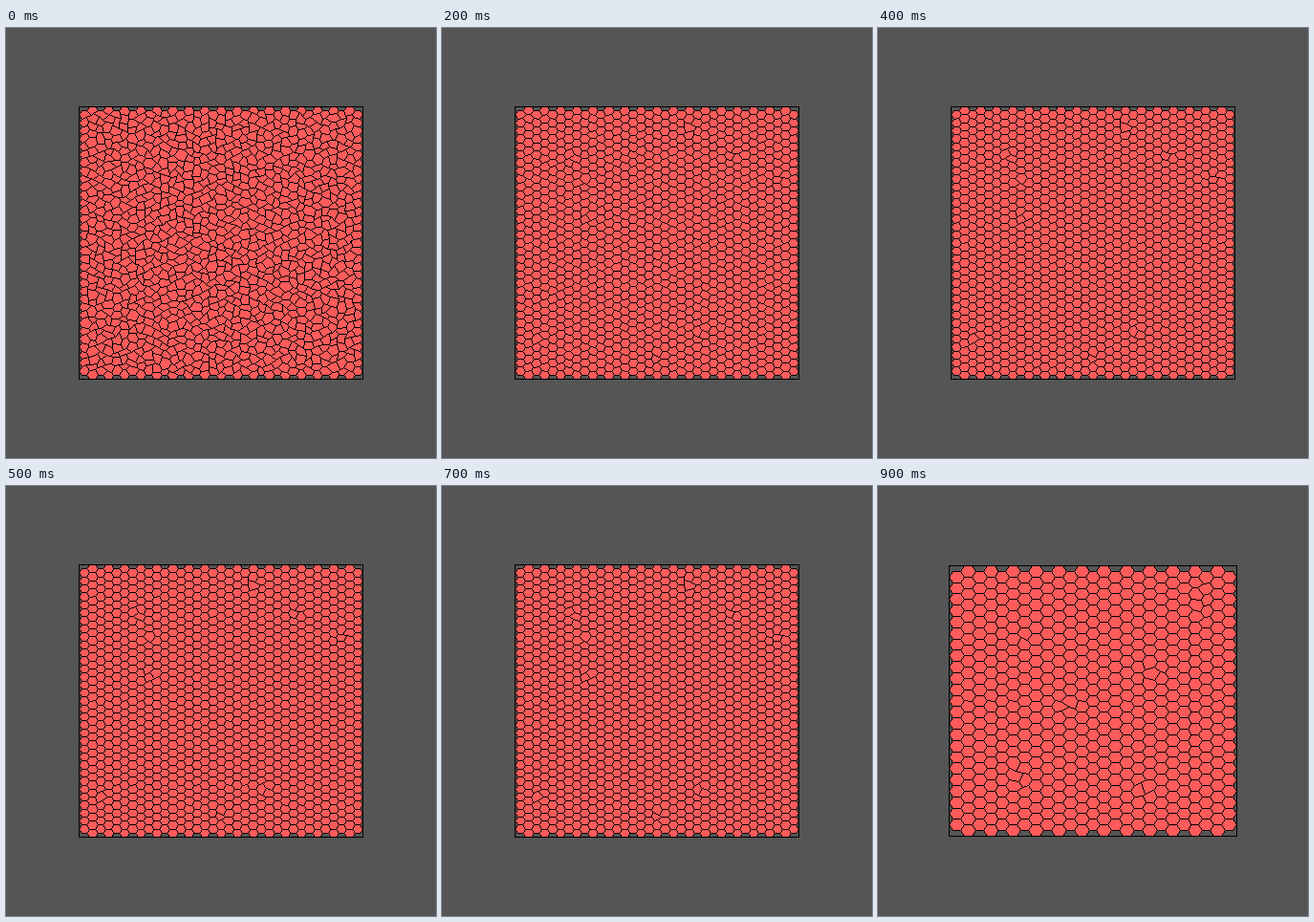
Animation, 450 px wide and 450 px high, one loop 1000 ms. Source, as an HTML page with a canvas:

```html
<!DOCTYPE html>
<html>
<head>
<meta charset="utf-8">
<style>
html, body { margin: 0; width: 100%; height: 100%; overflow: hidden; background: #555; }
canvas { display: block; }
</style>
</head>
<body>
<canvas id="stage" width="450" height="450"></canvas>
<script>
const ctx = document.getElementById('stage').getContext('2d');
const STEPS = 10, STEP_MS = 100, COARSE_FROM = 8;
const CORNERS = [[2, 0], [1, 1], [-1, 1], [-2, 0], [-1, -1], [1, -1]];

// Box, column count, and the spots where the mesh stays uneven
const fine = {
  x: 76, y: 82, w: 297, h: 285, cols: 35,
  spots: [[137, 134], [148, 157], [150, 199], [307, 132], [351, 157], [260, 102],
    [100, 325], [272, 318], [225, 344]]
};
const coarse = {
  x: 74, y: 83, w: 301, h: 283, cols: 25,
  spots: [[333, 105], [337, 128], [155, 160], [287, 195], [200, 231], [145, 304], [278, 319]]
};

function random(seed) {
  return () => (seed = seed * 16807 % 2147483647) / 2147483647;
}

function hexMesh({ x, y, w, h, cols, spots }) {
  const ux = w / (3 * cols + 1), uy = h / (2 * (cols - 1));
  const verts = new Map(), edges = new Map(), cells = new Path2D();
  const rnd = random(4711);

  const vertex = (i, j) => {
    const key = i + ',' + j;
    if (!verts.has(key)) {
      const px = x + i * ux, py = y + j * uy;
      const turn = rnd() * 2 * Math.PI, reach = 0.95 * ux * Math.sqrt(rnd());
      verts.set(key, {
        key, x: px, y: py, cells: 0,
        dx: reach * Math.cos(turn), dy: reach * Math.sin(turn),
        stuck: spots.some(s => Math.hypot(s[0] - px, s[1] - py) < 2.5 * ux)
      });
    }
    return verts.get(key);
  };

  for (let c = 0; c < cols; c++) {
    const odd = c % 2;
    for (let r = 0; r < cols - 2 + odd; r++) {
      const ring = CORNERS.map(([i, j]) => vertex(2 + 3 * c + i, 2 * r + 2 - odd + j));
      ring.forEach((v, k) => {
        const next = ring[(k + 1) % 6];
        v.cells++;
        edges.set([v.key, next.key].sort().join(), [v, next]);
        cells[k ? 'lineTo' : 'moveTo'](v.x + 0.5, v.y + 0.5);
      });
      cells.closePath();
    }
  }
  return { x, y, w, h, cells, edges: [...edges.values()] };
}

const meshes = [fine, coarse].map(hexMesh);

// Inner corners settle onto the regular grid, except at the stuck spots
function place(v, step) {
  const calm = Math.exp(-0.8 * step);
  const amp = v.cells < 3 ? 0 : v.stuck ? Math.max(calm, 0.9) : calm;
  return [Math.round(v.x + v.dx * amp), Math.round(v.y + v.dy * amp)];
}

// Crisp one-pixel line
function line([x1, y1], [x2, y2]) {
  const n = Math.max(Math.abs(x2 - x1), Math.abs(y2 - y1), 1);
  for (let i = 0; i <= n; i++) {
    ctx.fillRect(Math.round(x1 + (x2 - x1) * i / n), Math.round(y1 + (y2 - y1) * i / n), 1, 1);
  }
}

function draw(step) {
  const mesh = meshes[step < COARSE_FROM ? 0 : 1];
  ctx.fillStyle = '#555';
  ctx.fillRect(0, 0, 450, 450);
  ctx.fillStyle = ctx.strokeStyle = '#ff5b5b';
  ctx.lineWidth = 0.6;
  ctx.fill(mesh.cells);
  ctx.stroke(mesh.cells);
  ctx.fillStyle = ctx.strokeStyle = '#000';
  for (const [a, b] of mesh.edges) line(place(a, step), place(b, step));
  ctx.lineWidth = 1;
  ctx.strokeRect(mesh.x + 0.5, mesh.y + 0.5, mesh.w, mesh.h);
}

const start = performance.now();
let shown = -1;
function tick() {
  const step = Math.floor((performance.now() - start) / STEP_MS) % STEPS;
  if (step !== shown) draw(shown = step);
  requestAnimationFrame(tick);
}
tick();
</script>
</body>
</html>
```
